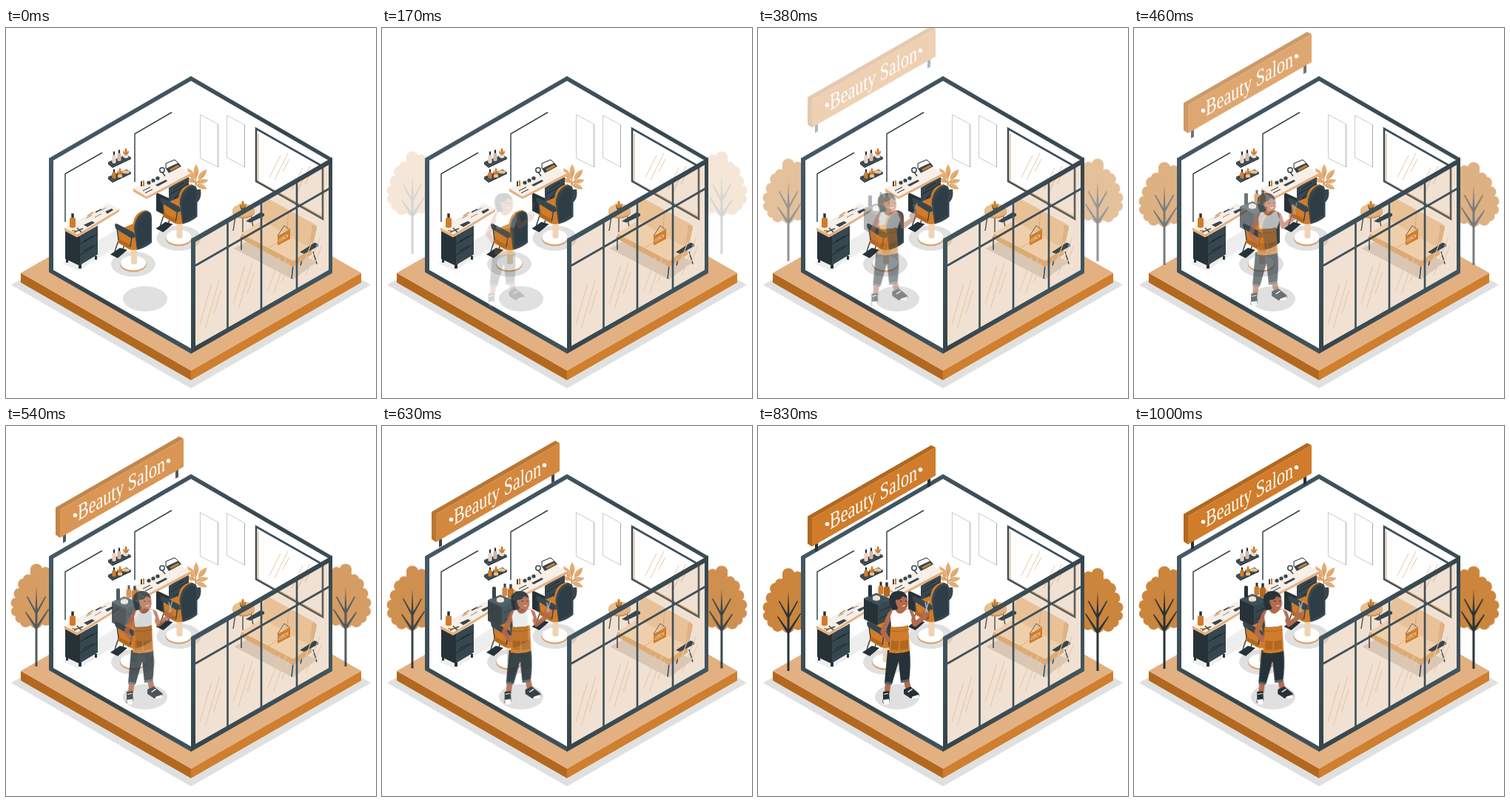
These frames come from a looping animation (500 by 500 pixels, 1040 ms). An HTML page without scripts:

```html
<!DOCTYPE html>
<html lang="en">
<head>
<meta charset="utf-8">
<title>Beauty Salon</title>
<style>
html, body { margin: 0; width: 100%; height: 100%; overflow: hidden; background: #fff; }
svg { display: block; width: 100vw; height: 100vh; }
text { font-family: "Liberation Serif", serif; fill: #fff; }

.dk { fill: #37474f; } .bk { fill: #263238; } .or { fill: #d07c2a; } .br { fill: #b2681f; }
.tan { fill: #e3b081; } .pe { fill: #ebc08f; } .wh { fill: #fff; } .gr { fill: #e0e0e0; } .sk { fill: #b46a4d; }
.ln { fill: none; stroke: #37474f; stroke-width: 1.5; }
.seam { fill: none; stroke: #1d272c; stroke-width: 1; }
.fr { fill: none; stroke: #3d4f58; stroke-width: 2.6; }
.shine { fill: none; stroke: #e6c9a9; stroke-width: 1; }

/* --x and --y set the direction an element drifts in from */
.early { animation: early 1040ms linear infinite; }
.late { animation: late 1040ms linear infinite; }
.drop { --x: 0px; --y: -1px; }
.side { --x: -1px; --y: 0px; }
.rise { --x: 0px; --y: .4px; }

@keyframes early {
  0%, 2% { opacity: 0; transform: translate(calc(var(--x) * 30), calc(var(--y) * 30)); }
  27.9% { opacity: .37; transform: translate(calc(var(--x) * 20), calc(var(--y) * 20)); }
  44.2% { opacity: .64; transform: translate(calc(var(--x) * 10), calc(var(--y) * 10)); }
  51.9% { opacity: .8; transform: translate(calc(var(--x) * 5), calc(var(--y) * 5)); }
  68.3% { opacity: 1; transform: none; }
  79.8% { opacity: 1; transform: translate(calc(var(--x) * -1), calc(var(--y) * -1)); }
  96.2%, 100% { opacity: 1; transform: translate(calc(var(--x) * 1.7), calc(var(--y) * 1.7)); }
}
@keyframes late {
  0%, 28% { opacity: 0; transform: translate(calc(var(--x) * 36), calc(var(--y) * 36)); }
  44.2% { opacity: .67; transform: translate(calc(var(--x) * 20), calc(var(--y) * 20)); }
  51.9% { opacity: .8; transform: translate(calc(var(--x) * 11), calc(var(--y) * 11)); }
  68.3% { opacity: 1; transform: none; }
  79.8% { opacity: 1; transform: translate(calc(var(--x) * -1), calc(var(--y) * -1)); }
  96.2%, 100% { opacity: 1; transform: translate(calc(var(--x) * 2), calc(var(--y) * 2)); }
}
</style>
</head>
<body>
<svg viewBox="0 0 500 500">
<defs>
  <linearGradient id="steel" x2="1" y2="1">
    <stop stop-color="#4a626e"/><stop offset=".5" stop-color="#35454d"/><stop offset="1" stop-color="#4a626e"/>
  </linearGradient>

  <g id="tree">
    <path fill="#cb853d" d="M33 197a8.500 8.500 0 0 1 16 0a7 7 0 0 1 11 8V272a8 8 0 0 1-11 1a9 9 0 0 1-16 1a8 8 0 0 1-14-3a6.500 6.500 0 0 1-6-9a6.500 6.500 0 0 1-3-12a7 7 0 0 1 3-13a7.500 7.500 0 0 1 5-13a8 8 0 0 1 5-13a7 7 0 0 1 10-5z"/>
    <path class="bk" d="M39.500 330V279L26 257l1-1 12.500 17V258L28 236l1-1 10.600 18L41 222l1.500 31L53 235l1 1-11.500 22v15L57 252l1 1-15.500 26v51z"/>
  </g>

  <g id="chair">
    <ellipse class="gr" cx="172" cy="319" rx="30" ry="17"/>
    <ellipse cx="172" cy="319" rx="18" ry="10.500" fill="#d89e66"/>
    <ellipse class="wh" cx="172" cy="317.600" rx="17.400" ry="9.800"/>
    <path fill="#f0d3b5" d="M169 298h8v20q-4 3-8 0z"/>
    <path class="ln" d="M154 281L147 302M162 286L157 302"/>
    <path class="bk" d="M141 306l13-9 10 3-13 11z"/>
    <path class="or" d="M151 273l22-9 3 35q-4 2-10 0l-15-9z"/>
    <path class="br" d="M151 284l17 9v6l-17-10z"/>
    <path class="or" d="M171 268q2-20 18-22l3 2-14 51-5 1z"/>
    <path class="dk" d="M173 271q2-20 17-24q7 1 7 9v34q-8 7-20 10z"/>
    <path fill="#2f3e46" d="M176 274q1-18 14-24q5 1 5 6v32l-17 9z"/>
    <path class="dk" d="M147 266q1-3 4-1l21 11q3 3 2 7l-5 1-21-13z"/>
    <path class="ln" d="M150 271l2 15M170 283l-2 13"/>
  </g>

  <g id="shelf">
    <path class="dk" d="M138 181l25-10 6 4-25 12z"/><path class="bk" d="M138 181l6 6v2l-6-5zM144 187l25-12v2l-25 12z"/>
  </g>
  <g id="bottle"><path d="M-3.500-9q0-2 2-2h3q2 0 2 2V0q-3.500 2-7 0z"/><path class="bk" d="M-1.500-16h3v5h-3z"/></g>
  <path id="sprig" class="or" d="M0 0q-6-3-4-7q2 2 3 4q-2-5 1-8q3 3 1 8q1-3 3-4q2 4-4 7z"/>
  <path id="leaf" d="M0 0q-7-9 0-19q7 10 0 19z"/>
  <path id="streaks" class="shine" d="M0 30L15 0M7 33L25-3M18 22L27 5"/>
</defs>

<!-- ground -->
<path class="gr" d="M7 347L250 207L493 347L250 487z"/>
<path class="br" d="M20 331L250 463V476L20 344z"/>
<path fill="#cf7f2d" d="M480 331L250 463V476L480 344z"/>
<path class="tan" d="M20 331L250 199L480 331L250 463z"/>

<g class="early drop">
  <use href="#tree"/>
  <use href="#tree" transform="matrix(-1 0 0 1 500 0)"/>
</g>

<!-- room shell -->
<path fill="url(#steel)" d="M250 65L441 176V331L250 440L58 330V176z"/>
<path class="wh" d="M250 71.500L436 179V328L250 433L64 327V179z"/>

<path class="ln" d="M80 262V197L130 168.500M174 208V143L224 114"/>
<path fill="none" stroke="#c8cccf" d="M262.500 117l24 13v58l-24-12zM298.500 118l24 13v57l-24-13z"/>
<path fill="none" stroke="#a9aeb1" d="M286.500 130v58M322.500 131v57"/>
<path class="fr" d="M338 136l90 51v71l-90-51z"/>
<path fill="none" stroke="#d9a673" d="M341 143v64l86 48"/>
<use href="#streaks" x="356" y="172"/><use href="#streaks" x="386" y="189"/>

<use href="#shelf"/><use href="#shelf" y="20"/>
<use href="#bottle" transform="translate(146 182) scale(.75 .95)" fill="#e9d3c2"/>
<use href="#bottle" transform="translate(153 179) scale(.75 .9)" fill="#d9b8a0"/>
<path class="gr" d="M157 171h9q0 5-4 5t-5-5z"/><use href="#sprig" transform="translate(162 172) scale(.9)"/>
<use href="#bottle" transform="translate(146 203) scale(.75)" class="or"/>
<use href="#sprig" transform="translate(154 199) scale(.9)"/>
<ellipse class="pe" cx="162" cy="194.500" rx="5" ry="2.300"/><path class="pe" d="M151 198h6v4h-6z"/>

<!-- first desk -->
<path class="gr" d="M76 318l22 10 55-34v-24z" opacity=".55"/>
<path class="bk" d="M80 273l19 9v39l-19-9zM81 312h3v5h-3zM98 319h4v6h-4zM120 308h3v5h-3z"/>
<path class="dk" d="M99 281l25-14v39l-25 15z"/>
<path class="seam" d="M99 281v39M100 292l23-13M100 307l23-14M105 288l13-7M105 301l13-7"/>
<path class="tan" d="M79 270v4l17 9 57-35v-4z"/>
<path fill="#f8efe7" d="M79 270l59-33 15 8-57 34z"/>
<use href="#bottle" transform="translate(90 269) scale(1.150)" class="or"/>
<path class="ln" d="M92 276l12-5M96 270l6 6M121 249l8-4"/>
<path class="dk" d="M105 266l11-5 4 2-10 6zM134 248l9-4 2 2-8 5z"/>
<path fill="none" stroke="#9aa1a5" stroke-width="1.300" d="M108 257l8-4M120 256l9-5M127 247l8-4"/>
<path fill="none" stroke="#d07c2a" stroke-width="1.300" d="M89 274h9M110 254l8-5"/>

<!-- plant -->
<path class="dk" d="M247 219l16-1q2 11-4 17-8 2-11-5z"/>
<g fill="#e3ad74">
  <use href="#leaf" transform="translate(256 205) rotate(-35)"/>
  <use href="#leaf" transform="translate(257 203)"/>
  <use href="#leaf" transform="translate(259 205) rotate(42)"/>
  <use href="#leaf" transform="translate(257 209) rotate(78) scale(.9)"/>
  <use href="#leaf" transform="translate(256 211) rotate(112) scale(.9)"/>
  <use href="#leaf" transform="translate(257 208) rotate(-75) scale(.8)"/>
</g>
<path fill="none" stroke="#c98a4d" d="M256 222l1-28M257 210l12-13M257 212l-9-14"/>

<!-- second desk -->
<path class="bk" d="M203 222l17 8v26l-17-9z"/>
<path class="dk" d="M220 216l27-18v44l-27 14z"/>
<path class="seam" d="M221 225l25-14M221 238l25-14M227 217l13-8M227 230l13-7"/>
<path class="tan" d="M172 217v4l18 10 60-31v-4z"/>
<path fill="#f8efe7" d="M172 217l60-30 18 9-60 32z"/>
<path class="dk" d="M216 190l17-8 4 5-17 9z"/><path class="or" d="M221 191l11-6 3 2-12 6z"/>
<path class="seam" d="M216 190v-7l12-5 4 4M185 220l10-5M188 223l10-5"/>
<g class="dk"><circle cx="193" cy="209" r="2.600"/><circle cx="199" cy="206" r="2.600"/><circle cx="205" cy="203" r="2.600"/>
<path d="M202 212l14-7 2 2-13 7zM182 207h2v7h-2z"/></g>
<path class="or" d="M185 206h2v8h-2z"/>
<circle class="ln" cx="211" cy="192" r="3.200"/><path class="ln" d="M211 195l4 5"/>

<!-- trolley -->
<g class="late rise">
  <path class="bk" d="M143 233l19 9v30l-19-11z"/><path class="dk" d="M162 242l18-8v28l-18 10z"/>
  <path fill="#3e515b" d="M143 233l17-7 20 8-18 9z"/>
  <path class="bk" d="M149 216q2.500-2 5 0v14q-2.500 2-5 0z"/>
  <use href="#bottle" x="166" y="227" class="or"/>
  <use href="#bottle" transform="translate(174 230) scale(1.150)" class="br"/>
  <path fill="#f0dfd0" d="M155 231q5-4 10 0v4q-5 3-10 0z"/>
  <path class="seam" d="M164 251l15-7M164 261l15-7"/>
</g>

<use href="#chair" x="61.500" y="-35"/>
<use href="#chair"/>
<ellipse class="gr" cx="188" cy="366" rx="30" ry="17"/>

<!-- hairdresser -->
<g class="early side">
  <path class="sk" d="M171 344h8l-2 17h-7zM195 341h8l3 14-7 3z"/>
  <path class="bk" d="M168 359l8-1 1 15q-2 4-7 3-4-2-2-7zM196 356l9-4 11 9q3 5-2 6l-9 1-9-6z"/>
  <path class="wh" d="M168 370l8-1 1 5q-3 4-8 2zM207 366l9-3q2 4-2 5l-7 0zM169 362l6-1v1l-6 1zM201 359l6-4 1 1-6 4z"/>
  <path class="bk" d="M174 303h30q2 22-1 42l-11 2-3-29-9 31-10-2z"/>
  <path fill="#52656f" d="M170 345l10 2-1 3-9-2zM192 344l11-2v3l-11 2z"/>
  <!-- skin: neck and shoulders, bent arm on the hip, raised arm -->
  <path class="sk" d="M177 250q6-4 10-4v-8h9l1 9q8 0 11 4l-5 16h-24z"/>
  <path fill="none" stroke="#b46a4d" stroke-width="6.500" stroke-linejoin="round" stroke-linecap="round" d="M178 254L167.500 278L175 289M206 253L211 268L224 258"/>
  <path class="wh" d="M181 249l3-1q6 11 15 0l4 0 4 11-4 12-24 1-1-15z"/>
  <path class="or" d="M178 271q12 3 24-2l2 35q-14 5-28 2z"/>
  <path class="br" d="M179 290l10 1v12l-10-1zM191 291l11-2v12l-11 2z"/>
  <path fill="none" stroke="#b2681f" d="M178 277q12 2 25-2"/>
  <path class="bk" d="M180 249q-5-12-3-19q4-8 13-7q8 0 11 9l-9 6-5 10z"/>
  <path class="sk" d="M185 238q-1-4 3-3 5-1 6-5 4 1 7 3 2 10-2 14-5 3-10 0-3-4-4-9z"/>
  <path class="bk" d="M191 236h2v1.300h-2zM198 236h1.500v1.300h-1.500z"/>
  <path fill="none" stroke="#fff" d="M194 243q3 1 4-1"/>
  <path class="sk" d="M219 254q3-7 9-5l3 3-2 6-7 3z"/>
  <path fill="none" stroke="#aeb7bc" stroke-width="1.500" d="M225 252l5-16M228 252l-3-14"/>
</g>

<!-- side table -->
<path class="ln" d="M310 254l-3 20M320 257v19M331 252l3 17"/>
<ellipse cx="321" cy="248" rx="15" ry="9.500" fill="#cf9358"/><ellipse class="pe" cx="321" cy="246.500" rx="15" ry="9"/>
<path class="dk" d="M316 241h8l-2 5h-4z"/><use href="#sprig" x="320" y="244"/>

<!-- glass front and waiting area -->
<path fill="#c58a52" fill-opacity=".26" d="M250 287L441 177V331L250 438z"/>
<path fill="#d9c6b5" d="M308 298l36-20 76 38-32 24z"/>
<path class="ln" d="M318 282v18M388 320l-2 19M345 268v10M415 302l5 17M402 305l-4 16"/>
<path fill="#e8c197" d="M348 234q2-5 7-3l62 34q3 2 3 6l-7 30-68-38z"/>
<path fill="#dfb183" d="M420 268l-7 33-4 3 5-38z"/>
<path fill="#efcfab" d="M318 278l28-18 67 38-25 17z"/>
<path fill="#dcab74" d="M318 278l70 37v8l-70-38zM388 315l25-17v8l-25 17z"/>
<path fill="none" stroke="#d8aa7a" d="M382 247l-3 34l-25 17"/>
<path class="dk" d="M324 261l20-12 5 2v3l-19 9zM397 303l20-13 5 2v3l-19 10z"/>
<path fill="none" stroke="#37474f" stroke-width=".8" d="M367 281l9-14 8 6"/>
<path class="or" d="M367 281l17-9v13l-17 9z"/>
<text font-size="7" transform="matrix(.72 -.4 0 1.100 368.500 290)">OPEN</text>
<use href="#streaks" transform="translate(262 346) scale(1.050 1.800)"/>
<use href="#streaks" transform="translate(307 322) scale(1.050 1.700)"/>
<use href="#streaks" transform="translate(354 310) scale(1.050 1.500)"/>
<use href="#streaks" transform="translate(398 288) scale(1.050 1.400)"/>
<path class="fr" d="M256 321L437 217M299.500 259V411M345 233V385M393 205V357"/>
<path fill="url(#steel)" d="M250 285L441 175V331L250 440zM256 289V430L436 327V185z" fill-rule="evenodd"/>

<!-- signboard -->
<g class="late drop">
  <path class="bk" d="M77 157h4v10l-4 2zM229 68h4v12l-4 2z"/>
  <path class="br" d="M67 121L234 25L240 28L73 124V162L67 158z"/>
  <path class="or" d="M73 124L240 28V66L73 162z"/>
  <circle class="wh" cx="93.500" cy="131.500" r="2.800"/><circle class="wh" cx="219.500" cy="58" r="2.800"/>
  <text font-size="31" transform="matrix(.71 -.41 0 1 97 139)">Beauty Salon</text>
</g>
</svg>
</body>
</html>
```
